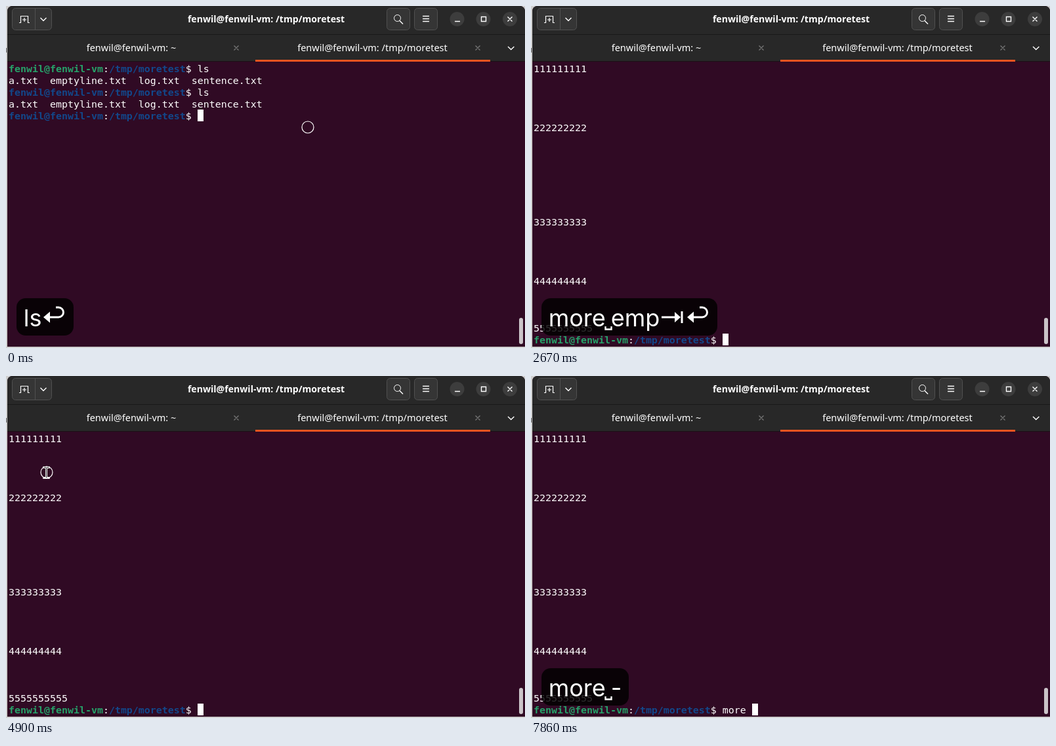
An HTML page that plays this animation: 791 px wide and 522 px high, repeating every 8000 ms.

```html
<!DOCTYPE html>
<html lang="en">
<head>
<meta charset="utf-8">
<title>Terminal session</title>
<style>
  html, body { margin: 0; width: 100%; height: 100%; overflow: hidden; background: #cfcfcf; }
  #stage { position: relative; width: 791px; height: 522px; overflow: hidden; }
  #stage > * { position: absolute; }
  #window { left: 2px; top: 0; width: 789px; height: 520px; background: #300a24; border-radius: 8px 8px 0 0; overflow: hidden; }
  #bar { height: 84px; background: #282828; border-bottom: 1px solid #1b1015; }
  #chrome { left: 0; top: 0; }
  #chrome text { font-family: "Noto Sans", sans-serif; fill: #fff; text-anchor: middle; }
  #term { left: 4px; top: 87px; margin: 0; color: #fff; font: 14.95px/18px "DejaVu Sans Mono", monospace; white-space: pre; }
  #term b { color: #26a269; }
  #term b + b { color: #12488b; }
  #caret { width: 9px; height: 18px; background: #fff; }
  #selection { left: 4px; top: 158px; width: 774px; height: 18px; background: #fff; }
  .keys { left: 16px; height: 57px; padding: 0 10.7px; border-radius: 14px; background: rgba(0, 0, 0, .82);
          color: #fff; font: 36px/60px Inter, sans-serif; white-space: nowrap; }
  .keys svg { height: 57px; vertical-align: top; overflow: visible; fill: none; stroke: #fff; stroke-width: 3; }
  .keys .head { fill: #fff; stroke: none; }
  #old { top: 379px; }
  #new { top: 446px; }
  #mouse { left: 0; top: 0; overflow: visible; }
</style>
</head>
<body>
<div id="stage">
  <div id="window"><div id="bar"></div></div>
  <svg id="chrome" width="791" height="522" fill="none" stroke="#fff">
    <path d="M0.5 64v7" stroke="#444"/>
    <path d="M2 43.5H791" stroke="#191919"/>
    <g fill="#353535" stroke="#505050">
      <rect x="9.5" y="3.5" width="60" height="33" rx="5"/>
      <path d="M44.5 4v32"/>
      <rect x="580.5" y="3.5" width="35" height="33" rx="5"/>
      <rect x="622.5" y="3.5" width="35" height="33" rx="5"/>
    </g>
    <path d="M20 25.5h2.500v-10h11v10h2.500M28 18v6M25 21h6" stroke-width="1.200"/>
    <path d="M52.500 18l4.500 4.500 4.500-4.500M765 62l4.700 4.500 4.700-4.500" stroke-width="1.400"/>
    <circle cx="596.500" cy="18.500" r="5"/>
    <path d="M600 22.500l5 5" stroke-width="1.400"/>
    <path d="M635 15.500h10M635 19.500h10M635 23.500h10" stroke-width="1.300"/>
    <g fill="#3d3d3d" stroke="none">
      <circle cx="687.500" cy="20" r="11"/><circle cx="727.500" cy="20" r="11"/><circle cx="768" cy="20" r="11"/>
    </g>
    <path d="M684 23.500h8M724.500 16.500h7v7h-7zM764.500 16.500l7 7M771.500 16.500l-7 7" stroke-width="1.400"/>
    <path d="M347.500 60.500l7 7M354.500 60.500l-7 7M715.500 60.500l7 7M722.500 60.500l-7 7" stroke="#777" stroke-width="1.300"/>
    <g stroke="none">
      <rect x="380" y="82" width="358" height="3" fill="#e95420"/>
      <rect x="782" y="476" width="6" height="40" rx="3" fill="#cbc4c9"/>
      <text x="396.500" y="25" font-size="14.100" font-weight="700">fenwil@fenwil-vm: /tmp/moretest</text>
      <text x="191" y="69" font-size="14.500">fenwil@fenwil-vm: ~</text>
      <text x="558.500" y="69" font-size="14.500">fenwil@fenwil-vm: /tmp/moretest</text>
    </g>
  </svg>
  <pre id="term"></pre>
  <div id="selection"></div>
  <div id="caret"></div>
  <div id="old" class="keys"></div>
  <div id="new" class="keys"></div>
  <svg id="mouse" width="1" height="1" fill="none">
    <g id="beam" stroke-linecap="square">
      <path id="ibeam" d="M-3.500-8h2q1 0 1.500 1 .5-1 1.500-1h2M0-7v14M-3.500 8h2q1 0 1.500-1 .5 1 1.500 1h2" stroke="#fff" stroke-width="3"/>
      <use href="#ibeam" style="stroke:#222"/>
      <path d="M-3.500-8h2q1 0 1.500 1 .5-1 1.500-1h2M0-7v14M-3.500 8h2q1 0 1.500-1 .5 1 1.500 1h2" stroke="#222" stroke-width="1"/>
    </g>
    <circle id="ring" r="9" stroke="#fff" stroke-width="1.200"/>
  </svg>
</div>
<script>
const LOOP = 8000;
const $ = id => document.getElementById(id);
const prompt = '<b>fenwil@fenwil-vm</b>:<b>/tmp/moretest</b>$ ';
const files = 'a.txt  emptyline.txt  log.txt  sentence.txt\n';
const listing = (prompt + 'ls\n' + files).repeat(2) + prompt;
const output = '111111111' + '\n'.repeat(5) + '222222222' + '\n'.repeat(8) +
  '333333333' + '\n'.repeat(5) + '444444444' + '\n'.repeat(4) + '5555555555\n' + prompt;

const icon = (width, body) => `<svg width="${width}">${body}</svg>`;
const icons = {
  '␣': icon(8, '<path d="M-.5 43v4.500h9v-4.500" stroke-width="2.400"/>'),
  '⇥': icon(39, '<path d="M3 29H25M34 20v18"/><path class="head" d="M23 21l9 8-9 8z"/>'),
  '↵': icon(38, '<path d="M10 29H26a7.500 7.500 0 0 0 0-15h-4"/><path class="head" d="M3 29l10-8.500v17z"/>')
};
const drawKeys = keys => keys.replace(/[␣⇥↵]/g, key => icons[key]);

// Each track lists [start time, value...]; values hold until the next entry.
const typed = [[0, ''], [890, 'mo'], [1040, 'more'], [1490, 'more '], [1640, 'more e'],
  [1780, 'more em'], [1930, 'more emp'], [2220, 'more emptyline.txt '], [2670, ''],
  [7420, 'm'], [7570, 'mor'], [7710, 'more'], [7860, 'more ']];
const newKeys = [[0, 'ls↵'], [740, 'm'], [890, 'mor'], [1040, 'more'], [1490, 'more␣'],
  [1640, 'more␣e'], [1780, 'more␣em'], [1930, 'more␣emp'], [2070, 'more␣emp⇥'],
  [2670, 'more␣emp⇥↵'], [4750, ''], [7270, 'm'], [7420, 'mo'], [7570, 'more'],
  [7710, 'more␣'], [7860, 'more␣-']];
const oldKeys = [[0, ''], [740, 'ls↵'], [1640, '']];
const mouse = [[0, 460, 185, 'ring'], [150, 0, 0, ''], [3560, 392, 184, 'ring beam'],
  [3710, 290, 166, 'ring beam'], [3860, 160, 143, 'ring beam'], [4000, 84, 133, 'ring beam'],
  [4150, 62, 131, 'ring beam'], [4450, 62, 134, 'ring beam'], [4600, 62, 139, 'ring beam'],
  [4750, 62, 144, 'ring beam'], [4900, 62, 147, 'ring beam'], [5040, 62, 154, 'ring beam'],
  [5190, 63, 162, 'ring beam'], [5630, 72, 163, 'ring beam'], [5780, 98, 163, 'ring beam'],
  [5930, 130, 162, 'ring beam'], [6080, 155, 161, 'beam'], [6230, 164, 161, 'beam'],
  [7270, 0, 0, '']];
const at = (track, t) => track.findLast(entry => entry[0] <= t).slice(1);

function setHtml(id, html) {
  const node = $(id);
  if (node.shown !== html) node.innerHTML = node.shown = html;
}
const show = (id, on) => { $(id).style.display = on ? '' : 'none'; };

function setKeys(id, keys) {
  show(id, keys);
  setHtml(id, drawKeys(keys));
}

function draw(t) {
  const done = t >= 2670;
  const [input] = at(typed, t);
  setHtml('term', (done ? output : listing) + input);
  $('caret').style.left = 292 + 9 * input.length + 'px';
  $('caret').style.top = 86 + 18 * (done ? 23 : 4) + 'px';
  setKeys('new', at(newKeys, t)[0]);
  setKeys('old', at(oldKeys, t)[0]);
  show('selection', t >= 5340 && t < 5930);
  const [x, y, parts] = at(mouse, t);
  show('ring', parts.includes('ring'));
  show('beam', parts.includes('beam'));
  $('ring').setAttribute('transform', `translate(${x} ${y})`);
  $('beam').setAttribute('transform', `translate(${x - .5} ${y + .5})`);
}

function tick() {
  draw(performance.now() % LOOP);
  requestAnimationFrame(tick);
}
tick();
</script>
</body>
</html>
```
